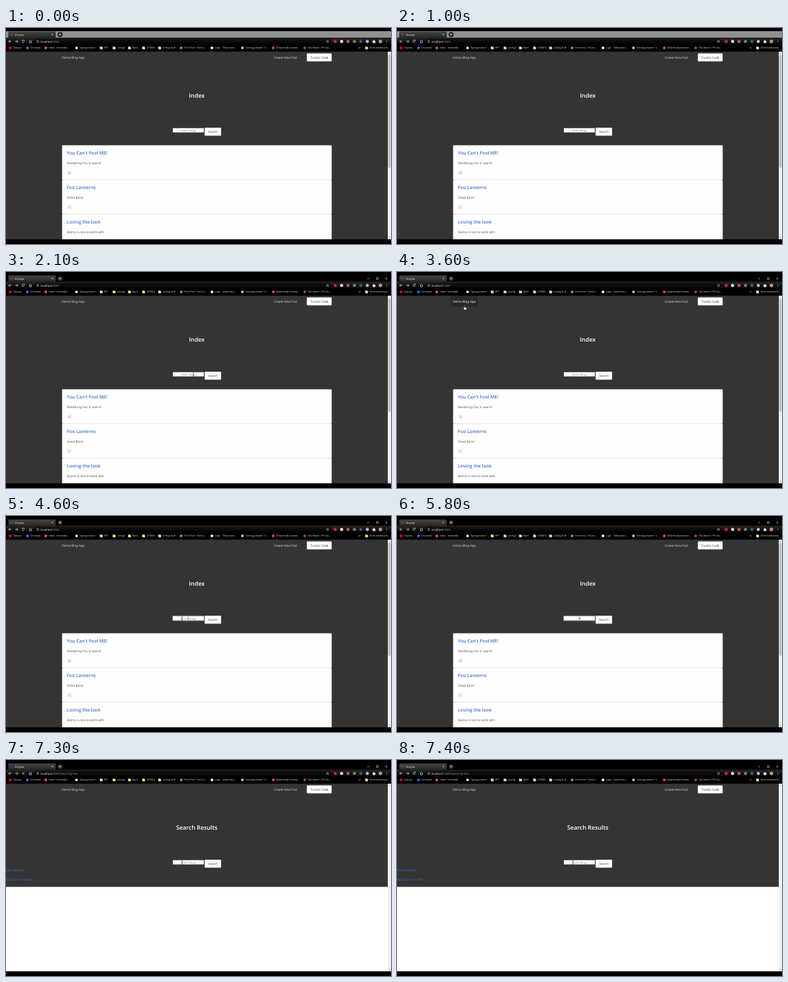
An HTML page that plays this animation: 600 px wide and 338 px high, repeating every 8000 ms.

```html
<!DOCTYPE html>
<html lang="en">
<head>
<meta charset="utf-8">
<title>Blog search demo</title>
<style>
  html, body { margin: 0; width: 100%; height: 100%; overflow: hidden; background: #000; }
  svg { display: block; width: 600px; height: 338px; }
  text { font: 4.75px "Open Sans", "Noto Sans", sans-serif; text-rendering: geometricPrecision; white-space: pre; }
  .mid { text-anchor: middle; }
  .heading { font-size: 9.2px; font-weight: 600; fill: #fff; }
  .title { font-size: 7.17px; font-weight: 600; fill: #3f74d0; }
  .body { fill: #4a4a4a; }
  .link { fill: #3273dc; }
  .mark { font-size: 3.5px; fill: #f4f4f4; }
  .icon { fill: none; stroke: #eee; stroke-width: .7; }
</style>
</head>
<body>
<svg viewBox="0 0 600 338">
  <defs>
    <linearGradient id="chrome" gradientUnits="userSpaceOnUse" x1="0" y1="5" x2="0" y2="26">
      <stop stop-color="#484848"/>
      <stop offset=".5" stop-color="#262626"/>
      <stop offset="1" stop-color="#020202"/>
    </linearGradient>
  </defs>

  <!-- page -->
  <rect y="37" width="600" height="294" fill="#343435"/>
  <rect id="hover" x="84" y="37.5" width="42" height="16.5" fill="#292929"/>
  <text id="brand" x="87" y="47.7" style="font-size:4.9px">Demo Blog App</text>
  <text x="417.3" y="47.7" fill="#ddd">Create New Post</text>
  <rect x="468.8" y="39.8" width="38.7" height="12.4" rx="1.2" fill="#fff"/>
  <text class="mid" x="488.2" y="47.8" fill="#363636">Trunko Code</text>
  <text id="heading" class="mid heading" x="297.3" y="109.3"></text>
  <rect id="ring" x="259.7" y="156.3" width="49.1" height="7.6" rx=".8" fill="none" stroke="#777" stroke-width="1.2"/>
  <rect x="260" y="156.8" width="48.3" height="6.6" fill="#fff" stroke="#8a8a8a" stroke-width=".4"/>
  <text id="field" class="mid" x="284" y="161.6" style="font-size:4px"></text>
  <path id="caret" fill="none" stroke="#000" stroke-width=".5"/>
  <rect x="309.6" y="156" width="25.6" height="12.5" rx="1.2" fill="#fff"/>
  <text class="mid" x="322.4" y="164" fill="#363636">Search</text>
  <g id="index"></g>
  <g id="results">
    <rect y="198.5" width="595" height="133" fill="#fff"/>
    <text class="link" x="0" y="174.2">Foo Lanterns</text>
    <text class="link" x="0" y="189.2">You Can't Fool ME!</text>
  </g>
  <rect x="595" y="37" width="5" height="294" fill="#f1f1f1"/>
  <rect id="thumb" x="595.5" y="42" width="4" height="176.5" fill="#c1c1c1"/>
  <path d="M596.4 40.3l1.1-1.3 1.1 1.3zM596.4 327.5l1.1 1.3 1.1-1.3z" fill="#777"/>
  <rect y="330.6" width="600" height="8"/>

  <!-- browser -->
  <rect width="600" height="37"/>
  <rect id="strip" y="5" width="600" height="10.2"/>
  <path d="M2 15.2q1.5 0 1.5-1.5V7q0-1.5 1.5-1.5h71q1.5 0 1.5 1.5v6.7q0 1.5 1.5 1.5z" fill="url(#chrome)"/>
  <circle id="favicon" cx="8.5" cy="10.3" r="1.8" fill="none" stroke="#777" stroke-width=".6"/>
  <text x="14" y="11.6" style="font-size:3.6px" fill="#eee">BlogApp</text>
  <circle cx="84.3" cy="10.2" r="4" fill="#262626"/>
  <path class="icon" stroke-width=".5" d="M71.2 9.2l2 2m0-2l-2 2M82.4 10.2h3.8m-1.9-1.9v3.8"/>
  <path id="controls" fill="none" stroke-width=".6" d="M562.8 10.2h3M577.4 8.8h2.8v2.8h-2.8zM591.4 8.8l2.8 2.8m0-2.8l-2.8 2.8"/>
  <rect y="15.2" width="600" height="11" fill="url(#chrome)"/>
  <rect x="44" y="16.7" width="462" height="8.4" rx="4.2" fill-opacity=".4"/>
  <path class="icon" d="M8.6 21H4.2m2-2l-2 2 2 2M14.2 21h4.4m-2-2l2 2-2 2M35.8 21l2.2-2 2.2 2m-3.7-.4v2.5h3v-2.5"/>
  <path id="reload" class="icon"/>
  <circle class="icon" cx="49.5" cy="21" r="1.6" style="stroke-width:.45"/>
  <path class="icon" style="stroke-width:.45" d="M49.5 20.8v1M49.5 20v.4"/>
  <text x="54" y="22.5" style="font-size:4.3px" fill="#fff">localhost<tspan id="path" fill="#999"></tspan></text>
  <path class="icon" style="stroke-width:.45" d="M501 18.9l.6 1.4 1.5.1-1.1 1 .3 1.5-1.3-.8-1.3.8.3-1.5-1.1-1 1.5-.1z"/>
  <g id="tools"></g>
  <path d="M571.3 19.7h1.3q0-1 .7-1t.7 1h1.3v1.3q1 0 1 .7t-1 .7v1.2h-4z" fill="#eee"/>
  <path d="M593.5 18.8v.9m0 .8v.9m0 .8v.9" class="icon"/>
  <g id="marks"></g>
  <path class="icon" style="stroke-width:.5" d="M549.7 30l1 1.1-1 1.1m1.6-2.2l1 1.1-1 1.1"/>

  <!-- pointer -->
  <path id="pointer" stroke-linejoin="round"/>
</svg>
<script>
const $ = id => document.getElementById(id);
const show = (id, on) => $(id).setAttribute("visibility", on ? "visible" : "hidden");
const attr = (id, name, value) => $(id).setAttribute(name, value);

const cards = [
  ["You Can't Fool ME!", "Rendering Foo in search", 6],
  ["Foo Lanterns", "Great Band", 1],
  ["Loving the look", "Bulma is nice to work with", 4]
];
$("index").innerHTML = cards.map(([title, body, count], i) => {
  const y = 183.4 + 53.9 * i;
  return `<rect x="87.4" y="${y}" width="420.2" height="53.9" rx="1.3" fill="#fefefe"/>
    <path d="M89 ${y + 53.9}h417" stroke="#ececec" stroke-width=".7"/>
    <text class="title" x="94.8" y="${y + 15}">${title}</text>
    <text class="body" x="95" y="${y + 29.3}">${body}</text>
    <circle cx="98.7" cy="${y + 42.9}" r="3.9" fill="#f0f0f0"/>
    <text class="mid body" x="98.7" y="${y + 44.2}" style="font-size:3.5px">${count}</text>`;
}).join("");

const toolColors = ["#d5202c", "#ddd", "#b8583a", "#777", "#3c5f62", "#9fb9d8"];
$("tools").innerHTML = toolColors.map((c, i) =>
  `<circle cx="${513 + 10 * i}" cy="21" r="2.5" fill="${c}"/>`).join("") +
  '<circle cx="583.5" cy="21" r="2.8" fill="#c58d84"/>';

// Bookmarks: icon x, label, icon colour (folders have none)
const marks = [
  [6.5, "Clipvara", "#f00"], [33.5, "Chumwall", "#1877f2"], [62, "Inbox - mvorel@k...", "#d75a4a"],
  [110, "Typing practice", "#ddd"], [148.5, "RPT"], [168.5, "Listings"], [192.5, "Bank"],
  [214.5, "STONKS"], [239.5, "Coding Stuff"], [273, "Finch Post - Finch a...", "#4f9bd0"],
  [321, "Login - Tolbarrow.c...", "#eee"], [368.5, "Tote-bag Drawer - S...", "#bbb"],
  [416.5, "[Download] Complet...", "#d64b45"], [465.5, "Fast Match | FPS Ga...", "#a33a4c"],
  [562, "Other bookmarks"]
];
$("marks").innerHTML = marks.map(([x, label, color]) =>
  (color ? `<circle cx="${x}" cy="31.1" r="2.2" fill="${color}"/>`
         : `<path d="M${x - 2.2} 28.9h1.8l.5.6h2.1v3.7h-4.4z" fill="#f3e08f"/>`) +
  `<text class="mark" x="${x + 4.6}" y="32.4">${label}</text>`).join("");

const pointers = {
  arrow: ["M0 0v5.4l1.2-1.1.9 1.9.8-.4-.8-1.8h1.7z", "#fff", .35],
  beam: ["M-.9-2.7h1.8M0-2.7v5.4M-.9 2.7h1.8", "none", .55],
  hand: ["M-.5-2.7q.5-.7 1 0v2l2.2.6q.5.2.4.8l-.6 2.4h-2.8l-1.8-2.3q0-.8.8-.5l.8.6z", "#fff", .35]
};
// Pointer moves: start, end, from, to
const moves = [
  [1500, 2100, [353.3, 121.2], [292, 160]],
  [2600, 3100, [292, 160], [105.3, 57.2]],
  [3200, 3300, [105.3, 57.2], [105.3, 56]],
  [3700, 4400, [105.3, 56], [274.3, 160.5]]
];

function pointerAt(t) {
  const [start, end, from, to] = moves.findLast(m => t >= m[0]) || moves[0];
  const p = Math.max(0, Math.min(1, (t - start) / (end - start)));
  const k = p * p * (3 - 2 * p);
  return from.map((v, i) => v + (to[i] - v) * k);
}

function render(now) {
  const t = Math.floor(now % 8000 / 100) * 100;
  const found = t >= 7300;
  const active = t >= 1300;
  const loading = t === 3800 || t === 7200 || t === 7300;
  const focused = t >= 4600 && !found;
  const typed = found || t < 5800 ? "" : t < 6100 ? "F" : t < 6300 ? "Fo" : "Foo";

  attr("strip", "fill", active ? "#000" : "#909090");
  attr("controls", "stroke", active ? "#eee" : "#a2a2a2");
  attr("reload", "d", loading ? "M25.2 19.3l3.4 3.4m0-3.4l-3.4 3.4"
    : "M28.6 21.6a1.9 1.9 0 1 1-.4-2.1m.5-.9v1.4h-1.4");
  show("favicon", !loading);
  $("path").textContent = ":3000" + (found ? "/search?q=Foo" : "");
  $("heading").textContent = found ? "Search Results" : "Index";
  show("index", !found);
  show("results", found);
  show("thumb", !found);

  show("ring", focused);
  $("field").textContent = typed || "Search Blogs";
  attr("field", "fill", typed ? "#222" : "#858585");
  const blinkStart = [6300, 6100, 5800, 5700, 4600].find(s => t >= s);
  show("caret", focused && t < 7200 && t - blinkStart < 500);
  attr("caret", "d", `M${284 + [0, 1.1, 2.3, 3.5][typed.length]} 157.7v4.9`);

  const [x, y] = pointerAt(t);
  const onBrand = x > 84 && x < 126 && y < 58;
  const onField = x > 260 && x < 308.5 && y > 157 && y < 163.5;
  const kind = onBrand ? "hand" : onField && t !== 7200 ? "beam" : "arrow";
  const [shape, fill, width] = pointers[kind];
  show("hover", onBrand);
  attr("brand", "fill", onBrand ? "#fff" : "#ddd");
  show("pointer", active && (t < 5800 || t >= 7200));
  attr("pointer", "d", shape);
  attr("pointer", "fill", fill);
  attr("pointer", "stroke", "#111");
  attr("pointer", "stroke-width", width);
  attr("pointer", "transform", `translate(${x} ${y})`);
}

const began = performance.now();
function tick() {
  render(performance.now() - began);
  requestAnimationFrame(tick);
}
tick();
</script>
</body>
</html>
```
